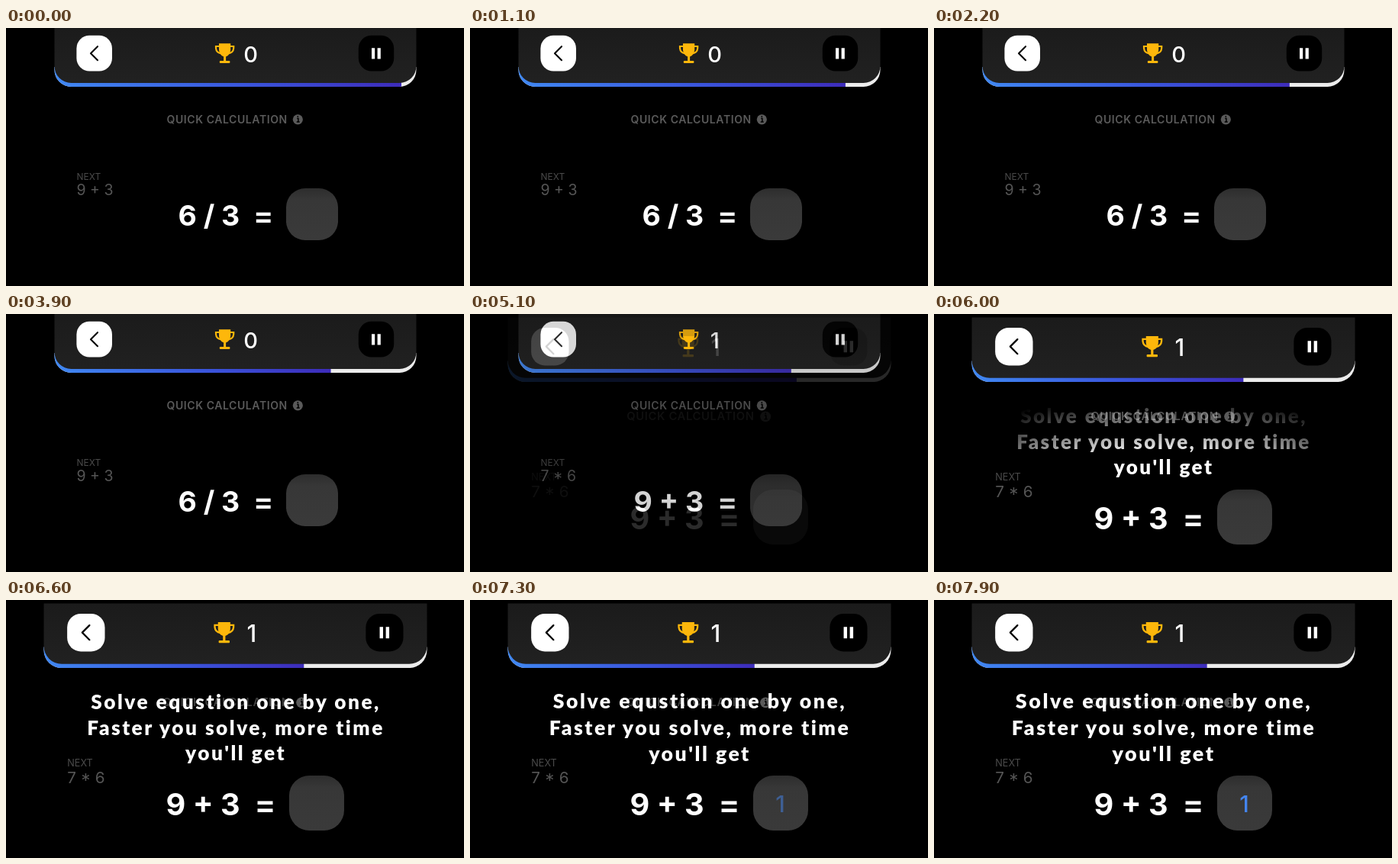
An HTML page for the animation above (8000 ms loop, 600 by 338 pixels).

```html
<!DOCTYPE html>
<html lang="en">
<head>
<meta charset="utf-8">
<title>Quick calculation</title>
<style>
html, body { margin: 0; width: 100%; height: 100%; overflow: hidden; background: #000; }
svg { display: block; width: 600px; height: 338px; font-family: Inter, sans-serif; fill: #fff; }
.caption { font: 900 26px Lato, sans-serif; letter-spacing: 2.45px; text-anchor: middle; }
</style>
</head>
<body>
<svg viewBox="0 0 600 338">
  <defs>
    <linearGradient id="panelFill" x2="0" y2="1">
      <stop stop-color="#1b1b1b"/><stop offset="1" stop-color="#212121"/>
    </linearGradient>
    <linearGradient id="barFill">
      <stop stop-color="#4088f2"/><stop offset=".55" stop-color="#3a55dc"/><stop offset="1" stop-color="#3d2cba"/>
    </linearGradient>
    <linearGradient id="boxFill" x2="0" y2="1">
      <stop stop-color="#2d2d2d"/><stop offset=".22" stop-color="#373737"/><stop offset="1" stop-color="#3a3a3a"/>
    </linearGradient>
    <clipPath id="barClip"><path d="M63.5-2.8h474V55a22 22 0 0 1-22 22h-430a22 22 0 0 1-22-22z"/></clipPath>
    <radialGradient id="reveal" gradientUnits="userSpaceOnUse" cx="0" cy="0" r="1" gradientTransform="translate(300 300) scale(1.85 1)">
      <stop id="revealInner" stop-color="#fff"/><stop offset="1" stop-color="#000"/>
    </radialGradient>
    <mask id="revealMask" maskUnits="userSpaceOnUse" x="0" y="0" width="600" height="338">
      <rect width="600" height="338" fill="url(#reveal)"/>
    </mask>
  </defs>

  <g id="scene">
    <g clip-path="url(#barClip)">
      <rect x="63" y="51" width="475" height="26" fill="#ececec"/>
      <rect id="bar" x="63" y="51" height="26" fill="url(#barFill)"/>
    </g>
    <path d="M63.5-2.8h474V50a22 22 0 0 1-22 22h-430a22 22 0 0 1-22-22z" fill="url(#panelFill)"/>

    <rect x="92.4" y="9.8" width="46.6" height="46.8" rx="17"/>
    <path d="M120 24.2l-9 9 9 9" fill="none" stroke="#000" stroke-width="2.1" stroke-linecap="round" stroke-linejoin="round"/>
    <rect x="461.8" y="9.8" width="46.4" height="46.8" rx="17" fill="#000"/>
    <path d="M479 26.3h4.2v14.1H479zM486.6 26.3h4.2v14.1h-4.2z"/>

    <g fill="#fdb70b">
      <path d="M279 20.3h15.2V29q-.6 6.5-6.1 8.4v5.9h-3v-5.9Q279.6 35.500 279 29z"/>
      <rect x="279.800" y="43" width="13.600" height="3" rx="1"/>
      <path d="M280 24h-5v2.500q.5 6 7 7M293.200 24h5v2.500q-.5 6-7 7" fill="none" stroke="#fdb70b" stroke-width="2.200"/>
    </g>
    <text id="score" x="320.700" y="44.500" font-size="29" font-weight="500" text-anchor="middle"></text>

    <g fill="#5a5a5a">
      <text id="heading" x="210.500" y="124.600" font-size="14" font-weight="600" letter-spacing=".58">QUICK CALCULATION</text>
      <circle cx="382.300" cy="119.800" r="6.600"/>
      <path d="M381.200 118.500h1.700v4.500m-2.200 0h4M382.300 115.200v1.700" stroke="#000" stroke-width="1.500" fill="none"/>
    </g>

    <text x="92.500" y="198.500" font-size="12" fill="#4a4a4a">NEXT</text>
    <text id="next" x="92.500" y="219.300" font-size="19.500" fill="#555"></text>

    <g font-size="37.500" font-weight="700">
      <text id="sum" x="306.300" y="258.800" text-anchor="end"></text>
      <text x="323.800" y="259.800" font-size="40" font-weight="600">=</text>
    </g>
    <rect x="367" y="210" width="68" height="68" rx="25" fill="url(#boxFill)"/>
    <text id="answer" x="400.500" y="255" font-size="28.500" font-weight="500" fill="#4485ee" text-anchor="middle"></text>
  </g>

  <g id="zoomed">
    <rect width="600" height="338" fill="#000"/>
    <use href="#scene" transform="translate(-17.700 7.500) scale(1.059)"/>
  </g>

  <g mask="url(#revealMask)">
    <g id="caption" class="caption">
      <text x="1" y="-25">Solve equstion one by one,</text>
      <text x="1" y="8.500">Faster you solve, more time</text>
      <text x="1" y="42">you'll get</text>
    </g>
  </g>
</svg>
<script>
const LOOP = 8, SOLVED = 4.75;
const $ = id => document.getElementById(id);
const set = (id, name, value) => $(id).setAttribute(name, value);
const ramp = (t, from, to) => Math.min(1, Math.max(0, (t - from) / (to - from)));

function setText(id, text) {
  if ($(id).textContent !== text) $(id).textContent = text;
}

function draw(t) {
  const solved = t >= SOLVED;
  setText('score', solved ? '1' : '0');
  setText('sum', solved ? '9 + 3' : '6 / 3');
  setText('next', solved ? '7 * 6' : '9 + 3');
  setText('answer', solved ? '1' : '2');
  set('answer', 'opacity', solved ? ramp(t, 7.2, 7.4) : ramp(t, 4.2, 4.35));

  // 20 seconds cover the whole bar; a right answer gives one second back
  const bonus = ramp(t, SOLVED, SOLVED + 0.2);
  set('bar', 'width', 455 - 23.7 * (t - bonus));

  set('zoomed', 'opacity', ramp(t, 5, 5.6));
  set('heading', 'opacity', 1 - 0.3 * ramp(t, 5.9, 6.4));

  // soft elliptical wipe spreading upward
  const radius = Math.max(1, 200 + 300 * (t - 6));
  set('reveal', 'r', radius);
  set('revealInner', 'offset', Math.max(0, 1 - 85 / radius));
  set('caption', 'visibility', t > 5.55 ? 'visible' : 'hidden');
  set('caption', 'transform', `translate(300 168) scale(${1 + 0.018 * (t - 6)})`);
}

function frame() {
  draw(performance.now() / 1000 % LOOP);
  requestAnimationFrame(frame);
}
frame();
</script>
</body>
</html>
```
